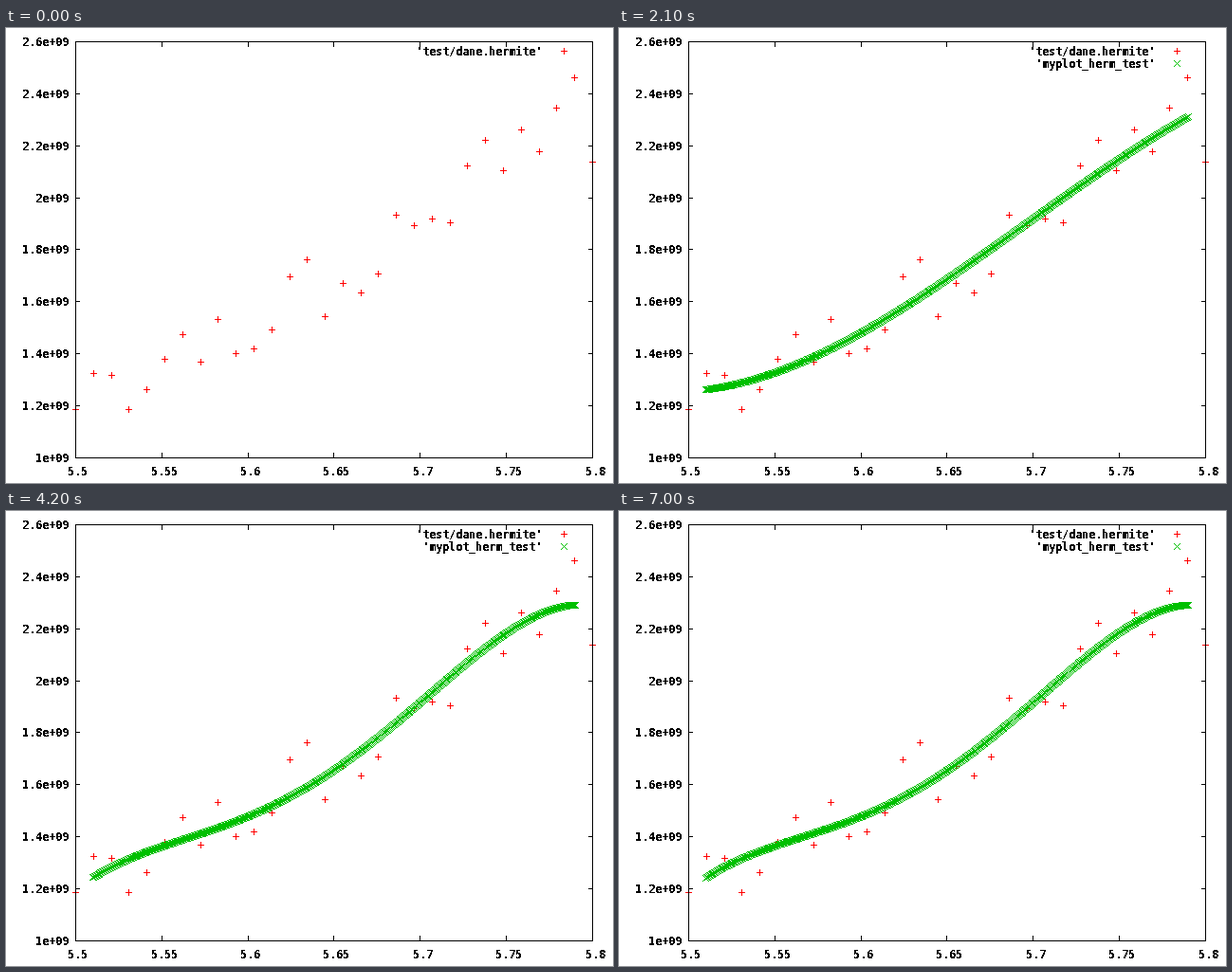
Write a matplotlib script that moves like this. It is 640x480 px and loops after 7700 ms.

```python
import numpy as np
import matplotlib.pyplot as plt
from matplotlib.animation import FuncAnimation
from numpy.polynomial import Polynomial

W, H, DPI = 640, 480, 100
LEFT, RIGHT, TOP, BOTTOM = 73, 618, 14, 453
RED, GREEN, BLACK = (255, 0, 0), (0, 192, 0), (0, 0, 0)
STEPS = 11

# The measured data: heights in pixels from the top, evenly spaced in x
SAMPLES = np.array([
    402, 364, 366, 402, 381, 349, 323, 352, 307, 343,
    338, 318, 262, 244, 304, 269, 279, 259, 197, 208,
    201, 205, 145, 118, 150, 107, 130, 84, 52, 141])

ARM = np.arange(-3, 4)
NIL = np.zeros_like(ARM)
PLUS = (np.r_[ARM, NIL], np.r_[NIL, ARM])
CROSS = (np.r_[ARM, ARM], np.r_[ARM, -ARM])


def px(values):
    """Nearest pixel, halves going down."""
    return np.ceil(np.asarray(values) - 0.5 - 1e-6).astype(int)


def to_x(v):
    return LEFT + (v - 5.5) / 0.3 * (RIGHT - LEFT)


def stamp(img, xs, ys, shape, color):
    dx, dy = shape
    img[np.add.outer(px(ys), dy), np.add.outer(px(xs), dx)] = color


x_ticks = np.linspace(5.5, 5.8, 7)
y_ticks = np.linspace(1, 2.6, 9)
tick_x = px(to_x(x_ticks))
tick_y = px(np.linspace(BOTTOM, TOP, len(y_ticks)))
sample_x = np.linspace(LEFT, RIGHT, len(SAMPLES))
fit_x = to_x(np.linspace(5.51, 5.79, 561))


def least_squares(degree):
    return Polynomial.fit(sample_x, SAMPLES, degree)(fit_x)


def fit_curve(step):
    """Degree grows to a cubic, then settles towards the quartic."""
    if step <= 3:
        return least_squares(step)
    share = 1 - 0.25 ** (step - 4)
    return (1 - share) * least_squares(3) + share * least_squares(4)


def draw_border(img):
    img[[TOP, BOTTOM], LEFT:RIGHT + 1] = BLACK
    img[TOP:BOTTOM + 1, [LEFT, RIGHT]] = BLACK
    for x in tick_x:
        img[TOP:TOP + 6, x] = BLACK
        img[BOTTOM - 5:BOTTOM + 1, x] = BLACK
    for y in tick_y:
        img[y, LEFT:LEFT + 5] = BLACK
        img[y, RIGHT - 4:RIGHT + 1] = BLACK


def render(step):
    img = np.full((H, W, 3), 255, np.uint8)
    stamp(img, sample_x, SAMPLES, PLUS, RED)
    stamp(img, [588], [24], PLUS, RED)
    if step:
        stamp(img, fit_x, fit_curve(step), CROSS, GREEN)
        stamp(img, [588], [37], CROSS, GREEN)
    draw_border(img)
    return img


plt.rcParams.update({
    "font.family": "DejaVu Sans Mono",
    "font.weight": "bold",
    "font.size": 7 / 0.602 * 72 / DPI,  # 7 px per character
    "text.antialiased": False,
    "text.hinting_factor": 1,
})

fig = plt.figure(figsize=(W / DPI, H / DPI), dpi=DPI, facecolor="white")
ax = fig.add_axes([0, 0, 1, 1])
ax.axis("off")
image = ax.imshow(render(0), extent=(0, W, H, 0), aspect="auto",
                  interpolation="nearest")
ax.set(xlim=(0, W), ylim=(H, 0))


def label(x, y, text, ha="right"):
    return ax.text(x, y, text, ha=ha, va="baseline", color="black")


for x, v in zip(tick_x, x_ticks):
    label(x + 3.5, 472, f"{v:.3g}", "center")
for y, v in zip(tick_y, y_ticks):
    label(66, y + 5, f"{v:.2g}e+09")
label(565, 29, "'test/dane.hermite'")
fit_key = label(565, 42, "'myplot_herm_test'")


def update(step):
    image.set_data(render(step))
    fit_key.set_visible(step > 0)
    return image, fit_key


anim = FuncAnimation(fig, update, frames=STEPS, interval=700,
                     repeat=True, repeat_delay=0)
plt.show()
```
